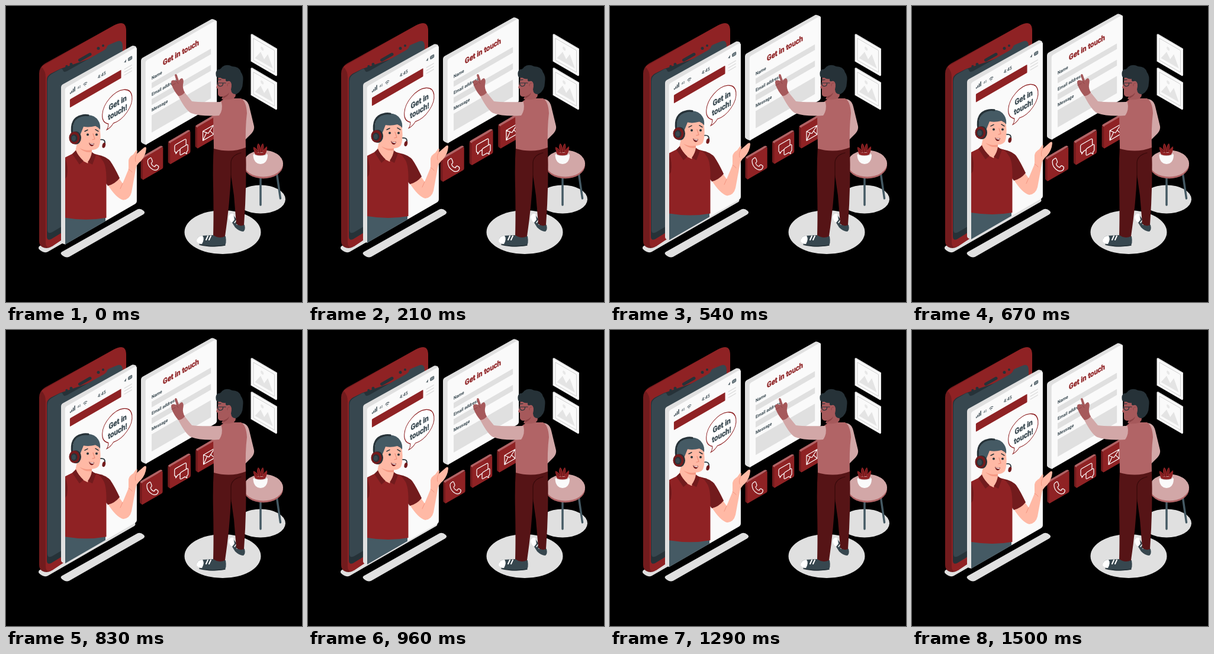
An HTML page for the animation above (1.54 s loop, 500 px wide and 500 px high).

```html
<!DOCTYPE html>
<html lang="en">
<head>
<meta charset="utf-8">
<title>Get in touch</title>
<style>
html, body { margin: 0; width: 100%; height: 100%; overflow: hidden; background: #000; }
svg { display: block; width: 100vw; height: 100vh; }
text { font-family: Roboto, sans-serif; font-weight: 700; fill: #37474f; }
.bold { stroke: #37474f; stroke-width: .4; stroke-linejoin: round; }
.title { fill: #8f2224; stroke: #8f2224; }
.red { fill: #8f2224; } .deep { fill: #721b1d; } .night { fill: #263238; } .slate { fill: #37474f; }
.paper { fill: #fafafa; } .grey { fill: #e0e0e0; } .skin { fill: #ffb9a5; } .rose { fill: #b16466; }
.pink { fill: #d2a7a7; } .tan { fill: #a6595b; } .pants { fill: #561416; } .steel { fill: #455a64; }
.line { fill: none; stroke-linecap: round; stroke-linejoin: round; }
</style>
</head>
<body>
<svg viewBox="0 0 500 500">
<defs>
  <g id="button">
    <path class="deep" d="M228.500 258Q228.500 255.500 230.500 254.500L261 236.500L233 293Q228.500 291 228.500 289Z"/>
    <path class="rose" d="M229 256Q229.500 255 231 254L261 236.500Q263 235.500 265.500 237.500L233 259Z"/>
    <rect class="red" width="39" height="36" rx="2" transform="matrix(.866 -.5 0 1 231.900 257.300)"/>
  </g>
  <g id="picture">
    <path class="grey" d="M413.500 48L415.500 47L458 72V117L456.500 118.500L413.500 93.500Z"/>
    <g transform="matrix(.866 .5 0 1 414.500 48.500)">
      <rect class="paper" width="49" height="45"/>
      <rect x="4" y="4" width="41" height="37" fill="#fafafa" stroke="#c8c8c8" stroke-width=".8"/>
      <path fill="#e4e4e4" d="M7 36L18 20L25 29L32 17L42 36Z"/>
      <circle cx="21" cy="13" r="3" fill="#e8e8e8"/>
    </g>
  </g>
  <clipPath id="screen"><path d="M100 100H260V310.600L100 403Z"/></clipPath>
</defs>

<!-- floor shadows and phone body -->
<path class="grey" d="M56 406L206 320L217 325Q220 328 217 331L70 415.500Q63 418 56 411Q54 409 56 406Z"/>
<path class="grey" d="M94 415.500L222 343.500Q227 341 232.500 346Q236 349 232 352L107 423.500Q102 426 97 422.500Q90 418 94 415.500Z"/>
<path class="deep" d="M56 114Q56 103 66 97L182 33Q192 27 200 34L76 407Q68 411 61 407Q56 404 56 397Z"/>
<path class="red" d="M62 101L182 33Q203 22 203 42V322L78 406Q67 411 67 399V121Q67 109 60 103Z"/>
<path class="night" d="M69 125Q69 118 76 114L92 106L197 70V320L76 394Q69 397 69 389Z"/>
<path class="slate" d="M70 127Q70 119 77 115L91 107Q95 105 96 108Q97 113 103 110L165 75Q170 72 171 68Q172 66 175 65L187 60Q197 56 197 68V312L78 382Q70 386 70 378Z"/>
<path class="line" stroke="#263238" stroke-width="5" d="M124.500 91.500L142 81.500"/>
<g class="night"><circle cx="102.500" cy="102" r="2.200"/><circle cx="110" cy="98.500" r="2.500"/><circle cx="156" cy="71.500" r="2.500"/><circle cx="164" cy="67" r="2"/></g>

<!-- form panel -->
<g class="float">
  <path class="grey" d="M228 93Q228 89 231 87.500L347 22.500Q350 21.500 355 25L237 235Q228 232 228 229Z"/>
  <g transform="matrix(.866 -.5 0 1 235.700 93)">
    <rect class="paper" width="139" height="142" rx="3.500"/>
    <g class="grey" transform="translate(12)">
      <rect y="43" width="115.500" height="9.500"/><rect y="70.500" width="115.500" height="10"/><rect y="98" width="115.500" height="29"/>
    </g>
  </g>
  <g font-size="7.700">
    <text transform="matrix(.866 -.5 0 1 246 125)">Name</text>
    <text transform="matrix(.866 -.5 0 1 246 152.500)">Email address</text>
    <text transform="matrix(.866 -.5 0 1 246 179)">Message</text>
  </g>
  <text class="bold title" font-size="13" transform="matrix(.866 -.5 0 1 265 101)">Get in touch</text>
</g>

<!-- contact buttons -->
<g id="buttons">
  <use href="#button"/><use href="#button" x="45.500" y="-26.200"/><use href="#button" x="90.700" y="-52.400"/>
  <g class="line" stroke="#fff" stroke-width="1.200">
    <path d="M242 258L245 256Q246 256 247 259L248 262Q248 264 246 265Q247 270 252 271Q253 268 255 268L258 270Q259 272 257 275Q254 278 249 276Q240 271 240 262Q240 259 242 258Z"/>
    <path d="M294 242.500L290 245L287 249.500V246.500Q285 247 285 245V237Q285 235 287 234L302 225.500Q304 224.500 304 226.500V234.500"/>
    <path d="M296 240L305 234.500Q307 233.500 307 235.500V243Q307 245 305 246V249.500L302 247.500L296 251Q294 252 294 250V243Q294 241 296 240Z"/>
    <path d="M332 212L350 201.500V217L332 227.500ZM332 212L341 215.500L350 201.500M332 227.500L338 214.500M350 217L344 211.500"/>
  </g>
</g>

<!-- phone screen and agent -->
<g class="float">
  <path class="grey" d="M93 138Q93 134 96 132.500L213 67.500Q216 66.500 220 69L101 403Q93 402 93 398Z"/>
  <g transform="matrix(.866 -.5 0 1 99.700 139)">
    <rect class="paper" width="140" height="264" rx="3.500"/>
    <rect class="red" x="9.500" y="23.700" width="100" height="14" rx="1"/>
    <path class="line" stroke="#dcdcdc" stroke-width="1.500" d="M116 26H130M116 31H130M116 36H130"/>
    <path stroke="#37474f" stroke-width="1.700" d="M10.500 15V12.500M13.300 15V11M16.100 15V9M18.900 15V7"/>
    <path class="line" stroke="#37474f" d="M36 12Q39.500 9 43 12M37.500 14Q39.500 12.500 41.500 14M39.500 16V16.100"/>
    <path class="slate" d="M115 14.500L119.500 11L118.300 16.500L117.300 14.700Z"/>
    <rect x="123.500" y="11" width="7" height="5" rx="1" fill="#78868c" stroke="#37474f" stroke-width=".8"/>
  </g>
  <text font-size="5.500" style="font-weight:400" transform="matrix(.866 -.5 0 1 120.500 141)">4G</text>
  <text font-size="8" style="font-weight:500" transform="matrix(.866 -.5 0 1 155 123.500)">4:45</text>
  <path fill="#fff" stroke="#8f2224" stroke-width="1.200" transform="matrix(.866 -.5 0 1 188.300 170.300)" d="M-18 19.800A29 25 0 1 1 -8 24Q-13 29 -21 28.600Q-17 25 -18 19.800Z"/>
  <g class="bold" font-size="13.300">
    <text transform="matrix(.866 -.5 0 1 173.500 177)">Get in</text>
    <text transform="matrix(.866 -.5 0 1 172.300 193.500)">touch!</text>
  </g>

  <g clip-path="url(#screen)"><path class="steel" d="M98 350H168V366L98 408Z"/></g>
  <path class="skin" d="M171 301L190 290L197 300L207 276V261Q208 255 215 251L220 244Q223 243 221 250L233 239.500Q237 237 237 241Q236 253 228 262Q220 268 219 277L212 315Q209 327 198 328Q186 325 171 301Z"/>
  <path class="line" stroke="#f08c78" stroke-width=".8" d="M221 250Q217 256 219 263M207 276Q211 278 213 281M197 300L193 309"/>
  <path class="deep" d="M147 250Q168 253 176 262Q183 272 192 291Q184 301 172 304L154 280Z"/>
  <path class="red" d="M100 256L120 246L142 248Q158 251 163 261Q169 268 169.500 290V358Q136 364 100 358Z"/>
  <path class="deep" d="M100 258Q106 272 103 288L100 292Z"/>
  <path class="skin" d="M120 232L143 240L146 250L138 266L130 262L117 246Z"/>
  <path fill="#f59a85" d="M124 240Q135 246 145 243L145 247Q133 249 124 240Z"/>
  <path class="deep" d="M118 244L112 250L124 268L131 262Q122 254 118 244ZM145 247L152 252L146 268L138 264Q144 256 145 247Z"/>
  <path class="skin" d="M119 208Q125 193 144 194Q157 196 159 211Q161 228 157 238Q152 245 140 243Q124 241 120 230Z"/>
  <path class="steel" d="M113 213Q111 192 127 186Q148 181 156 194Q160 200 159 209Q156 205 151 203Q140 206 131 204L127 214Q124 223 118 225Z"/>
  <path class="line" stroke="#263238" stroke-width="3.200" d="M112 217Q108 190 128 185.500Q133 184 139 185"/>
  <ellipse class="night" cx="118" cy="223" rx="9" ry="11"/><ellipse class="deep" cx="115.500" cy="223" rx="9" ry="10.500"/>
  <ellipse class="night" cx="115" cy="223.500" rx="5.500" ry="6.500"/><ellipse class="slate" cx="114.500" cy="223.500" rx="3.500" ry="4.500"/>
  <path class="line" stroke="#263238" stroke-width="1.700" d="M160 226Q168 225 167 233"/>
  <ellipse class="deep" cx="165.500" cy="235.500" rx="2.700" ry="4.500" transform="rotate(15 165 235)"/>
  <g class="night"><circle cx="138" cy="217.500" r="2"/><circle cx="153" cy="217.500" r="2"/></g>
  <path class="line" stroke="#263238" stroke-width="1.500" d="M133 212L138 209.500M151 209L156 212"/>
  <path class="line" stroke="#ee8d78" stroke-width="1.200" d="M147 216L150 225L146 226"/>
  <path class="deep" d="M140 231Q145 234 149 232Q148 238 144 237Q141 236 140 231Z"/>
  <path fill="#fff" d="M140.500 231.500Q145 234 148.500 232.500L147.500 234.500Q143 235 140.500 231.500Z"/>
</g>

<!-- wall pictures, table and plant -->
<use href="#picture"/><use href="#picture" y="57"/>
<ellipse class="grey" cx="430" cy="326.500" rx="42" ry="24"/>
<path class="line" stroke="#455a64" stroke-width="3.500" d="M430 287V336M457 280L463.500 325"/>
<ellipse class="rose" cx="434.500" cy="269" rx="33.500" ry="22.500"/>
<ellipse class="pink" cx="434.500" cy="266" rx="33.500" ry="22.500"/>
<path class="red" d="M422 250Q417 243 418 238Q424 240 426 246Q422 237 426 232Q430 235 430 243Q430 235 434 232Q437 237 434 245Q436 240 441 237Q442 244 437 251Z"/>
<path class="line" stroke="#561416" stroke-width=".9" d="M426 235L429 249M434 235L431 249M420 241L427 249"/>
<path class="paper" d="M417.500 251Q430 243 442 251Q442 266 430 267Q418 266 417.500 251Z"/>
<ellipse class="grey" cx="429.800" cy="250.500" rx="11" ry="3"/>
<path class="red" d="M421 251L419 246Q425 249 428 247Q435 249 440 245L438 251Q430 254 421 251Z"/>

<!-- visitor -->
<ellipse class="grey" cx="366" cy="382" rx="64.500" ry="37"/>
<path class="slate" d="M377 358L382 351L390 361L403 370Q405 378 401 381Q394 381 387 374Z"/>
<path fill="#fff" d="M376 356Q378 350 384 351L386 361L382 366Q377 363 376 356Z"/>
<path class="line" stroke="#fff" stroke-width="1.500" d="M386 366L390 361M390 369L394 365"/>
<path class="slate" d="M323 397Q322 389 331 388L350 387L371 389Q373 402 369 405Q344 409 327 402Z"/>
<path fill="#fff" d="M322 397Q323 388 332 388Q336 393 331 402Q324 402 322 397Z"/>
<path class="line" stroke="#fff" stroke-width="2" d="M338 395L341 388.500M343 395L346 388.500"/>
<path class="line" stroke="#263238" stroke-width="1.500" d="M327 403Q345 408 370 404"/>
<path class="pants" d="M351 236L405 236Q407 300 402 370Q395 373 389 368L385 320L380 285Q378 335 370 389Q360 394 350 387Q351 355 350 305Q349 268 351 236Z"/>
<path class="line" stroke="#360a0b" stroke-width="1.200" d="M397 248Q381 252 380 264L380 290"/>
<path class="pink" d="M396 157Q408 157 411 170L419 203Q420 209 415 215L404 226Z"/>
<path class="rose" d="M360 164Q366 156 376 156L397 156Q406 161 407 181Q404 205 405 239Q380 249 351 241L350 184Z"/>
<path class="pink" d="M291 152L301 145L314 161Q325 163 364 162Q367 176 360 185Q330 187 313 181Q304 177 291 152Z"/>
<path class="tan" d="M291 152Q284 144 280 134Q278 128 280 126Q284 124 288 127L285 117Q286 113.500 288.500 116L292 126Q295 122 297.500 122Q301 124 299 133Q298 139 302 146Q297 152 291 152Z"/>
<path class="line" stroke="#8b4245" stroke-width=".8" d="M280 134L286 131M288 127L291 131"/>
<path class="tan" d="M359 116L382 119L388 150Q388 157 377 158Q368 159 364 157L366 153Q359 154 358 149L358 140L355 138L358 128Z"/>
<path fill="#8b4245" d="M366 153Q374 151 377 146Q376 152 367 156Z"/>
<path class="night" d="M355 119Q353 110 358 107Q362 108 365 103Q372 97 382 102Q394 102 397 112Q402 118 400 130Q400 143 389 149Q381 150 380 141Q383 130 377 127Q370 129 371 123Q366 124 362 121Q358 122 355 119Z"/>
<ellipse class="tan" cx="375.500" cy="133" rx="5" ry="6.500" transform="rotate(15 375 133)"/>
<path class="line" stroke="#8b4245" stroke-width=".8" d="M374 135Q373 130 378 130"/>
<path class="line" stroke="#263238" stroke-width="1.200" d="M357 130H371M358 130Q358 136 362.500 135.500Q367 135 366.500 130M357 125L363 124.500"/>
</svg>
<script>
const panels = document.querySelectorAll('.float');
const buttons = document.getElementById('buttons');
const ramp = (x, start, peak, end) =>
  Math.max(0, Math.min((x - start) / (peak - start), (end - x) / (end - peak)));

function draw() {
  const time = ((performance.now() % 1540) * 0.987 + 20) % 1500;
  const lift = -10 * ramp(time, 0, 750, 1500);
  const beat = Math.max(ramp(time, 0, 150, 450), ramp(time, 600, 750, 900));
  panels.forEach(p => p.setAttribute('transform', `translate(0 ${lift})`));
  buttons.setAttribute('transform', `translate(292.5 238) scale(${1 + 0.1 * beat}) translate(-292.5 -238)`);
  requestAnimationFrame(draw);
}
draw();
</script>
</body>
</html>
```
